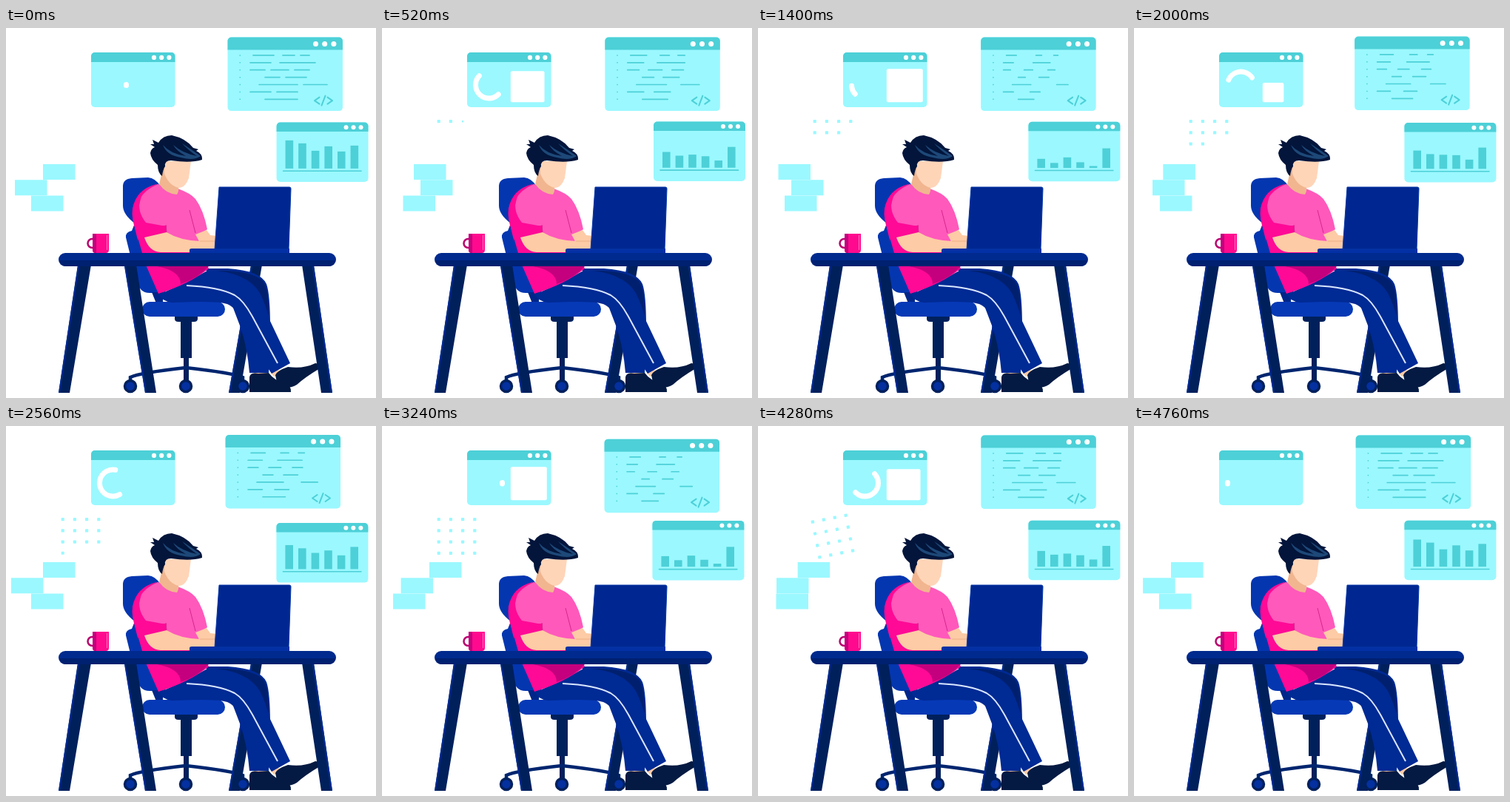
These frames come from a looping animation (500x500 px, 4.8 s). An HTML page with a canvas:

```html
<!DOCTYPE html>
<html lang="en">
<head>
<meta charset="utf-8">
<title>Working at a desk</title>
<style>
  html, body { margin: 0; width: 100%; height: 100%; overflow: hidden; background: #fff; }
  svg, canvas { position: absolute; left: 0; top: 0; width: 500px; height: 500px; }
</style>
</head>
<body>
<svg viewBox="0 0 500 500">
  <!-- chair -->
  <path fill="#0436b0" d="M158 214Q158 204 170 203L192 202Q202 203 208 213L215 262V358H194Q180 358 176 340L162 283Q161 276 170 274L174 264Q158 252 158 240Z"/>
  <path fill="#00268a" d="M197 357H212V372H203Z"/>
  <path fill="#00205c" d="M228 388H259V393Q259 397 254 397H251V446H247V480H240V446H236V397H233Q228 397 228 393Z"/>
  <path fill="none" stroke="#00256f" stroke-width="4.500" d="M168 478V472Q180 466 243 459Q306 466 320 472V478"/>
  <!-- desk legs behind the person -->
  <path fill="#00205c" d="M97 320H115L86 493H71ZM331 320H346L316 493H301Z"/>
  <path fill="none" stroke="#002b94" stroke-width="2" d="M98 322L72 493M332 322L302 493"/>
  <g fill="#0430a0" stroke="#00205c" stroke-width="3.500">
    <circle cx="168" cy="484" r="7.500"/><circle cx="243" cy="484" r="7.500"/><circle cx="320" cy="484" r="7.500"/>
  </g>
  <rect x="184" y="370" width="112" height="20" rx="10" fill="#0639b6"/>
  <!-- legs and shoes -->
  <path fill="#fdcba5" d="M335 464H353V470H335ZM358 466L368 461L371 468L362 471Z"/>
  <path fill="#041a42" d="M329 472Q330 465 341 467L355 466Q362 476 378 481Q386 484 385 492H329Z"/>
  <path fill="#041a42" d="M364 469Q366 463 381 458Q402 461 418 453Q425 453 424 460Q404 472 393 482Q382 489 367 484Z"/>
  <path fill="#002a94" d="M268 325H300Q344 328 352 346Q357 360 357 405L355 466H329Q326 430 316 402L300 360Z"/>
  <path fill="#00206f" d="M276 328Q330 326 347 342Q355 352 355 388L340 365Z"/>
  <path fill="#002a94" d="M207 360L240 345L274 327Q326 330 343 358Q352 376 356 394L384 453L359 467Q335 434 322 402Q313 379 299 373Q286 368 224 371Q210 369 207 360Z"/>
  <path fill="none" stroke="#d9e6ff" stroke-width="2" d="M244 348Q288 350 309 361Q321 368 333 390L367 453"/>
  <!-- shirt -->
  <path fill="#ff0a96" d="M203 211Q176 218 171 244Q169 257 176 276L188 318L206 359Q248 346 274 325L263 303L268 276L240 260Z"/>
  <path fill="#c4007e" d="M204 322H274Q260 338 236 346Q236 328 204 322Z"/>
  <path fill="#ff59bb" d="M205 211Q187 219 181 231Q177 248 189 263L216 268L217 277L215 300H263L260 280L272 272Q267 246 256 231Q249 223 232 217Z"/>
  <path fill="#ff0a96" d="M174 239Q169 254 178 286L217 276V267Q195 269 184 262Q175 252 183 228Z"/>
  <path fill="none" stroke="#d5268f" d="M248 246L256 277M217 277L216 266"/>
  <!-- arms -->
  <path fill="#fdcba5" d="M187 283L217 276Q235 287 262 288L284 287V303H209Q193 302 187 283ZM256 279L271 273L276 280L286 281V292H263Z"/>
  <path fill="none" stroke="#eeb087" d="M262 288H282"/>
  <!-- head -->
  <path fill="#f1b68f" d="M208 190H234L233 215Q234 220 231 225Q216 224 207 211L210 198Z"/>
  <path fill="#ffd5b8" d="M214 180L250 180L247 203Q242 216 234 216Q221 214 214 197Z"/>
  <path fill="#03153b" d="M201 161L195 157L200 157L198 151L206 155Q212 145 224 145Q243 149 253 162L260 164L257 166Q266 170 265 178Q250 183 223 179Q214 179 215 187Q212 191 211 200Q205 196 205 185Q196 178 195 169Q196 163 201 161Z"/>
  <path fill="#1d4878" d="M212 158Q222 170 243 173Q230 166 226 158Q238 169 258 173Q246 165 238 156Q252 165 263 173Q254 180 236 175Q217 172 212 158Z"/>
  <!-- desk, laptop and mug -->
  <path fill="#00205c" d="M160 320H176L203 493H188ZM400 320H416L441 493H426Z"/>
  <path fill="none" stroke="#002b94" stroke-width="2" d="M161 322L189 493M415 322L440 493"/>
  <rect x="71" y="304" width="375" height="18" rx="9" fill="#002a8e"/>
  <path fill="#002070" d="M72 314H445Q443 322 436 322H81Q74 322 72 314Z"/>
  <path fill="#0430a6" d="M248 300Q248 298 251 298H383V304H248Z"/>
  <path fill="#002791" stroke="#0636a8" d="M288 215H383Q385 215 385 217L382 299H282Z"/>
  <circle cx="116.500" cy="291" r="6" fill="none" stroke="#b8006f" stroke-width="2.500"/>
  <path fill="#ff0a8f" d="M117 278H139V300Q139 304 135 304H121Q117 304 117 300Z"/>
  <path fill="#c4007e" d="M117 278H122V304H121Q117 304 117 300Z"/>
  <path fill="#ff72bf" d="M136 280H137V300H136Z"/>
</svg>
<canvas id="stage" width="500" height="500"></canvas>
<script>
const ctx = document.getElementById('stage').getContext('2d');
const LOOP = 4800, STEP = 40, SPIN = 1600;
const DARK = '#4dd0d7', LIGHT = '#9bf8ff';

const ramp = (t, from, to) => {
  const u = Math.min(1, Math.max(0, (t - from) / (to - from)));
  return u * u * (3 - 2 * u);
};
const bell = (t, center, width) => Math.exp(-(((t - center) / width) ** 2));
// One rise and fall per loop, and two per loop.
const swell = t => Math.sin(Math.PI * t / LOOP);
const pulse = t => Math.abs(Math.sin(2 * Math.PI * t / LOOP));
// Eased travel through [time, value] key points.
const travel = (...keys) => t => keys.slice(1).reduce(
  (v, [time, value], i) => v + (value - keys[i][1]) * ramp(t, keys[i][0], time), keys[0][1]);

const blocks = [
  travel([0, 50], [1400, 27.5], [2560, 50], [3240, 64], [LOOP, 50]),
  travel([0, 12], [520, 52], [1400, 45], [2560, 7], [3760, 38], [LOOP, 12]),
  travel([0, 34], [520, 28.5], [1400, 36], [2560, 34], [3240, 15], [3760, 15], [LOOP, 34])
];
const barHeights = [38, 34, 24, 30, 23, 31];
const barDips = [.7, .83, .42, .77, .92, .15];
const codeRows = [
  ' -------   ----  ---',
  '-------   ------------',
  '-----  ------  -----',
  '     -----  -------',
  '   -------------  --------',
  '-------  -------',
  '     -----------'
];

function rect(x, y, w, h, color, radius = 0) {
  ctx.fillStyle = color;
  ctx.beginPath();
  ctx.roundRect(x, y, w, h, radius);
  ctx.fill();
}
function stroke(points, width, color = DARK) {
  ctx.strokeStyle = color;
  ctx.lineWidth = width;
  ctx.beginPath();
  points.forEach(p => ctx.lineTo(...p));
  ctx.stroke();
}
function panel(w, h, bar, dotX, gap, r) {
  rect(0, 0, w, h, LIGHT, 5);
  rect(0, 0, w, bar, DARK, [5, 5, 0, 0]);
  for (let i = 0; i < 3; i++) rect(dotX + i * gap - r, bar / 2 + .4 - r, 2 * r, 2 * r, '#fff', r);
}
function at(x, y, draw) {
  ctx.save();
  ctx.translate(x, y);
  draw();
  ctx.restore();
}

function drawDonut(t) {
  panel(113.5, 74, 13, 85, 10.2, 3.1);
  const turn = Math.floor(t / SPIN), phase = t % SPIN / SPIN;
  const middle = 3 * Math.PI * (turn + ramp(phase, 0, 1));
  const half = .03 + 2.1 * Math.sin(Math.PI * phase) ** 2;
  ctx.strokeStyle = '#fff';
  ctx.lineWidth = 7;
  ctx.beginPath();
  ctx.arc(29.5, 44, 18, middle - half, middle + half);
  ctx.stroke();
  const size = ramp(pulse(t), .25, .7);
  if (size > 0) rect(58.8, 67.3 - 45 * size, 49 * size, 45 * size, '#fff', 2);
}

function drawCode(t) {
  panel(155.5, 99.5, 17, 119, 12.2, 3.5);
  const scale = 1 - .3 * swell(t) - .3 * pulse(t) ** 2;
  codeRows.forEach((row, i) => {
    const y = 24.3 + i * 9.9;
    rect(16, y - .7, 1.5, 1.5, DARK);
    for (const { 0: dashes, index } of row.matchAll(/-+/g)) {
      const x = 30.5 + index * 4;
      stroke([[x, y], [x + dashes.length * 4 * scale, y]], 1.7);
    }
  });
  stroke([[124, 81], [117.5, 85.5], [124, 90]], 2);
  stroke([[132, 79], [127, 92]], 2);
  stroke([[135, 81], [141.5, 85.5], [135, 90]], 2);
}

function drawChart(t) {
  panel(124, 80.5, 12.5, 94, 10, 3);
  barHeights.forEach((full, i) => {
    const h = full * (1 - barDips[i] * pulse(t));
    rect(12 + i * 17.6, 62.3 - h, 10.6, h, DARK);
  });
  stroke([[9, 65.7], [114.5, 65.7]], 1.6);
}

function drawDots(t) {
  ctx.rotate(Math.PI / 2 * ramp(t, 3500, 4500));
  const leave = 1 - ramp(t, 4400, 4600);
  for (let i = 0; i < 16; i++) {
    const start = 40 + i * 200;
    const s = 4.2 * ramp(t, start, start + 140) * leave;
    if (s > 0) rect((i % 4 - 1.5) * 16.2 - s / 2, ((i >> 2) - 1.5) * 15.2 - s / 2, s, s, LIGHT, s * .2);
  }
}

function frame(now) {
  const t = Math.floor(now % LOOP / STEP) * STEP;
  ctx.clearRect(0, 0, 500, 500);
  ctx.lineCap = ctx.lineJoin = 'round';
  at(115, 33, () => drawDonut(t));
  at(299.5 + 5 * pulse(t) - 4 * swell(t), 12.6 - 2 * bell(t, 2250, 300) + 5.5 * bell(t, 3150, 300),
    () => drawCode(t));
  at(365.4 + 1.6 * bell(t, 520, 350), 127.8 - 2 * bell(t, 900, 600) + 3.3 * bell(t, 2560, 350),
    () => drawChart(t));
  at(101, 149, () => drawDots(t));
  blocks.forEach((x, i) => rect(x(t), 184 + i * 21.2, 43.5, 21, LIGHT));
  requestAnimationFrame(frame);
}
requestAnimationFrame(frame);
</script>
</body>
</html>
```
